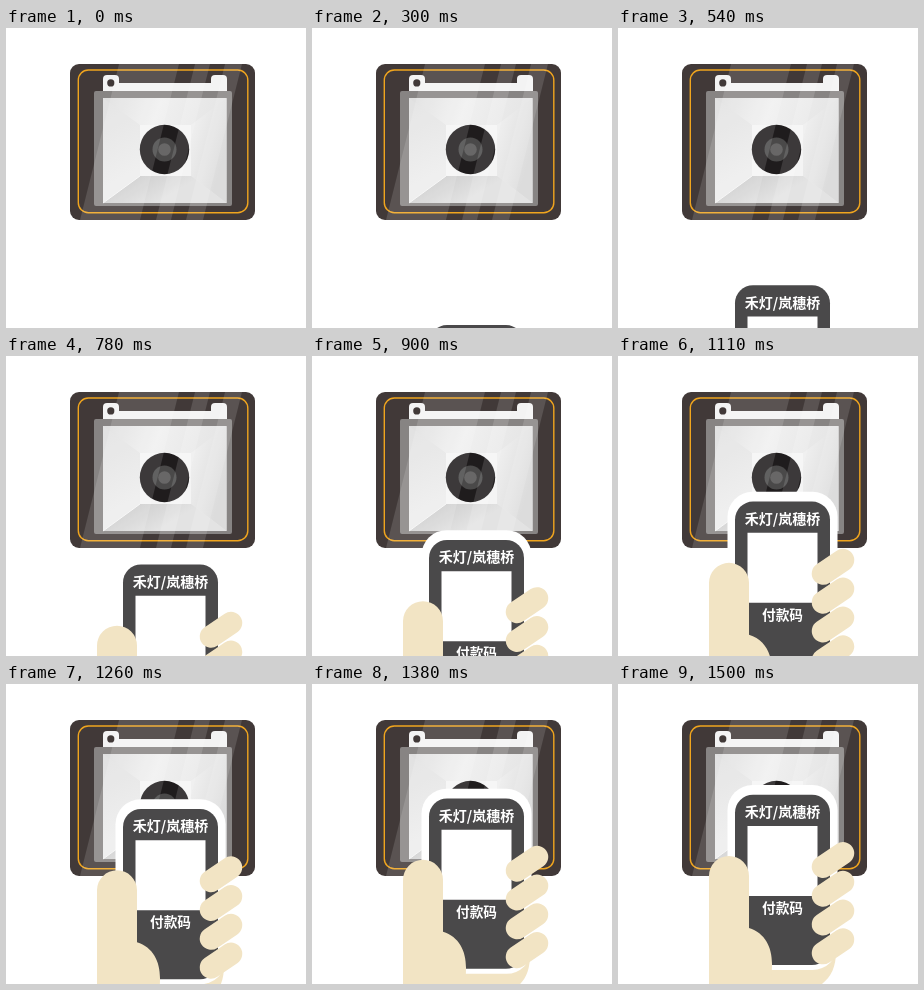
These frames come from a looping animation (300x300 px, 1.8 s). An HTML page with a canvas:

```html
<!DOCTYPE html>
<html lang="zh">
<head>
<meta charset="utf-8">
<style>
  html, body { margin: 0; width: 100%; height: 100%; overflow: hidden; background: #fff; }
  canvas { display: block; width: 300px; height: 300px; }
</style>
</head>
<body>
<canvas id="stage" width="300" height="300"></canvas>
<script>
const ctx = document.getElementById('stage').getContext('2d');
const LOOP = 1800, STEP = 30, ENTER = 300, REST = 1500, TRAVEL = 208;
const SKIN = '#f2e4c4', CASE = '#4a494a', BODY = '#413938';

function box(x, y, w, h, r, fill) {
  ctx.beginPath();
  ctx.roundRect(x, y, w, h, r);
  ctx.fillStyle = fill;
  ctx.fill();
}

function poly(points, fill) {
  ctx.beginPath();
  points.forEach(([x, y]) => ctx.lineTo(x, y));
  ctx.closePath();
  ctx.fillStyle = fill;
  ctx.fill();
}

function disc(x, y, r, fill) {
  ctx.beginPath();
  ctx.arc(x, y, r, 0, Math.PI * 2);
  ctx.fillStyle = fill;
  ctx.fill();
}

function gradient(x0, y0, x1, y1, ...colors) {
  const g = ctx.createLinearGradient(x0, y0, x1, y1);
  colors.forEach((c, i) => g.addColorStop(i / (colors.length - 1), c));
  return g;
}

function label(text, y, size) {
  ctx.font = `700 ${size}px "Noto Sans CJK SC", "Noto Sans CJK", sans-serif`;
  ctx.textAlign = 'center';
  ctx.textBaseline = 'alphabetic';
  ctx.fillStyle = '#fff';
  ctx.fillText(text, 164.5, y);
}

function drawChamber() {
  box(88, 63, 138, 115, 2, '#878483');
  box(97, 70, 123.5, 105, 0, gradient(97, 70, 200, 110, '#dedede', '#f0f0f0', '#e6e6e6'));
  poly([[97, 70], [134, 97], [134, 148], [97, 175]], gradient(97, 80, 134, 148, '#e2e2e2', '#ededed'));
  poly([[220.5, 70], [185, 97], [185, 148], [220.5, 175]], gradient(185, 110, 220, 120, '#eeeeee', '#dcdcdc'));
  poly([[97, 175], [134, 148], [185, 148], [220.5, 175]], gradient(134, 148, 150, 175, '#cfcfcf', '#e3e3e3'));
  box(134, 97, 51, 51, 0, '#f4f4f4');
  ctx.strokeStyle = '#f6f6f6';
  ctx.lineWidth = 1;
  ctx.beginPath();
  ctx.moveTo(97, 175);
  ctx.lineTo(134, 148);
  ctx.stroke();
}

function drawLens() {
  disc(158.5, 121.5, 24.7, '#1f1c1d');
  disc(158.5, 121.5, 12, '#4a4949');
  disc(158.5, 121.5, 6.3, '#686767');
}

function drawGlare() {
  ctx.save();
  ctx.beginPath();
  ctx.roundRect(64, 36, 185, 156, 9);
  ctx.clip();
  for (const [left, right] of [[74, 134], [150, 165], [180, 197]]) {
    poly([[left, 192], [left + 39, 36], [right + 39, 36], [right, 192]], 'rgba(255,255,255,.13)');
  }
  ctx.restore();
}

function drawScanner() {
  box(64, 36, 185, 156, 9, BODY);
  ctx.beginPath();
  ctx.roundRect(72.3, 42, 169.5, 142.7, 10);
  ctx.strokeStyle = '#f0a51e';
  ctx.lineWidth = 1.4;
  ctx.stroke();
  box(97, 47, 16, 16, [4, 4, 0, 0], '#f3f3f3');
  box(205, 47, 16, 16, [4, 4, 0, 0], '#f3f3f3');
  box(97, 55, 124, 8, 0, '#f3f3f3');
  disc(104.8, 54.9, 3.6, BODY);
  drawChamber();
  drawLens();
  drawGlare();
}

function drawPalm() {
  ctx.beginPath();
  ctx.moveTo(91, 330);
  ctx.lineTo(91, 260);
  ctx.lineTo(218, 260);
  ctx.bezierCurveTo(219, 282, 214, 292, 204, 300);
  ctx.lineTo(170, 330);
  ctx.fillStyle = SKIN;
  ctx.fill();
}

function drawPhone() {
  box(109.5, 101, 110, 185, 25, '#fff');
  box(117, 110.7, 95, 170.3, 18, CASE);
  label('禾灯/岚穗桥', 133, 14);
  box(129.5, 142, 70, 70, 0, '#fff');
  label('付款码', 229, 13.7);
}

function drawFingers() {
  ctx.beginPath();
  ctx.moveTo(91, 330);
  ctx.lineTo(91, 192);
  ctx.arc(111, 192, 20, Math.PI, 0);
  ctx.lineTo(131, 244);
  ctx.bezierCurveTo(147, 249, 154, 263, 154, 280);
  ctx.lineTo(153, 330);
  ctx.fillStyle = SKIN;
  ctx.fill();

  ctx.strokeStyle = SKIN;
  ctx.lineWidth = 22.5;
  ctx.lineCap = 'round';
  for (let i = 0; i < 4; i++) {
    const y = 182.7 + i * 28.8;
    ctx.beginPath();
    ctx.moveTo(205, y);
    ctx.lineTo(225, y - 13.5);
    ctx.stroke();
  }
}

function render(time) {
  ctx.fillStyle = '#fff';
  ctx.fillRect(0, 0, 300, 300);
  drawScanner();
  if (time < ENTER) return;

  const left = Math.max(0, Math.ceil((REST - time) / STEP)) * STEP / REST;
  ctx.save();
  ctx.translate(0, TRAVEL * left * left * (3 - 2 * left));
  drawPalm();
  drawPhone();
  drawFingers();
  ctx.restore();
}

const start = performance.now();
function tick() {
  render((performance.now() - start) % LOOP);
  requestAnimationFrame(tick);
}
tick();
</script>
</body>
</html>
```
